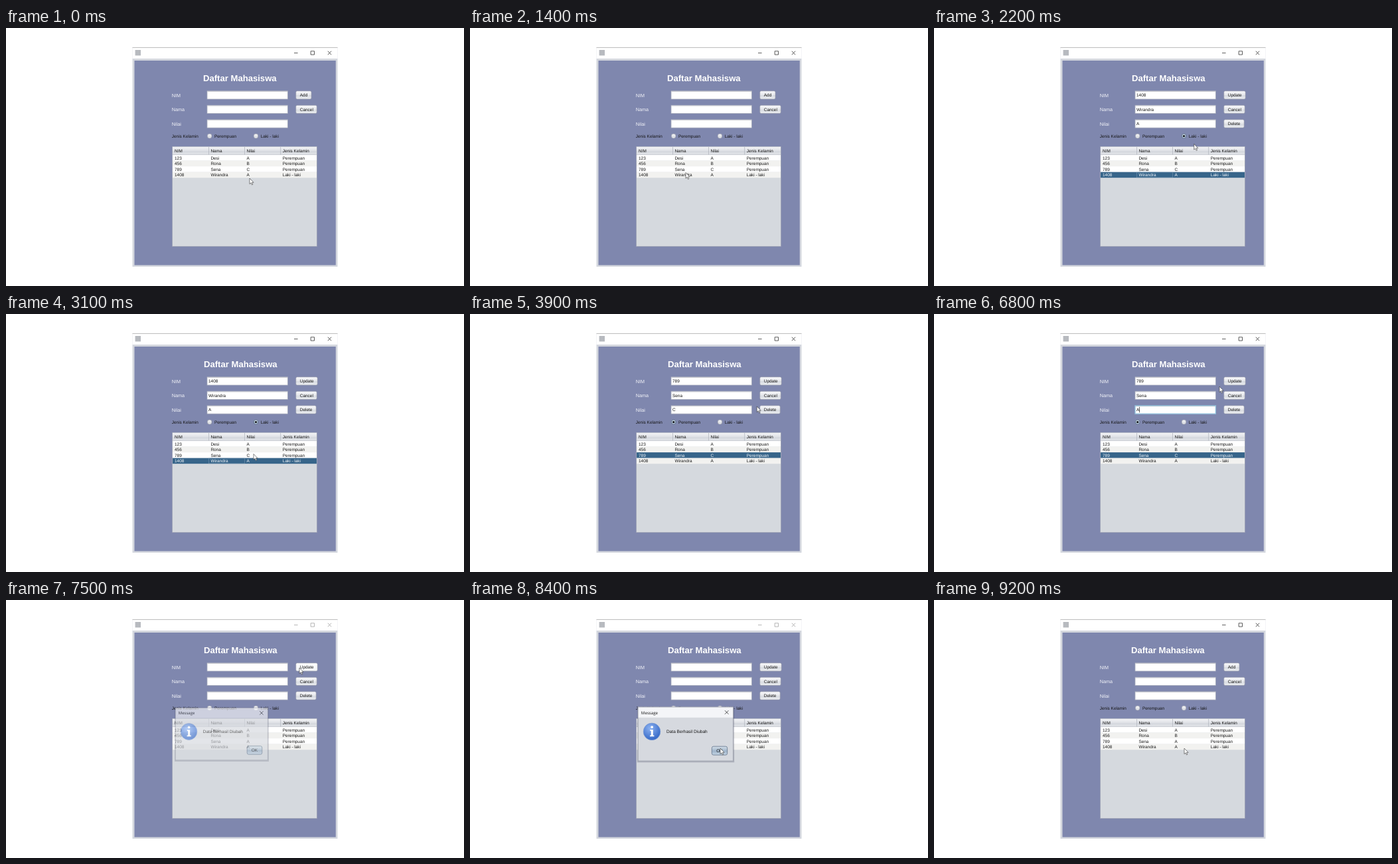
Write an HTML page that moves like this. It is 690 px wide and 388 px high and loops after 9400 ms.

```html
<!DOCTYPE html>
<html lang="id">
<head>
<meta charset="utf-8">
<title>Daftar Mahasiswa</title>
<style>
  html, body { margin: 0; width: 100%; height: 100%; overflow: hidden; background: #fff; }
  svg { display: block; width: 690px; height: 388px; }
  text { font: 6.45px "Liberation Sans", Arial, sans-serif; fill: #161616; text-rendering: geometricPrecision; white-space: pre; }
  .label { font-size: 7.2px; fill: #f4f5fa; }
  .title { font-size: 13.1px; font-weight: bold; fill: #fff; }
  .caption { font: 6px "Open Sans", sans-serif; }
  .chosen text { fill: #f4f7fa; }
  .line { fill: none; stroke: #333; stroke-width: .8; }
</style>
</head>
<body>
<svg viewBox="0 0 690 388">
  <defs>
    <linearGradient id="btn" x2="0" y2="1">
      <stop offset="0" stop-color="#fafafc"/><stop offset=".5" stop-color="#e4e6ea"/>
      <stop offset=".55" stop-color="#d8dbe1"/><stop offset="1" stop-color="#eceef1"/>
    </linearGradient>
    <linearGradient id="hot" x2="0" y2="1">
      <stop offset="0" stop-color="#fff"/><stop offset="1" stop-color="#f1f3f6"/>
    </linearGradient>
    <linearGradient id="blue" x2="0" y2="1">
      <stop offset="0" stop-color="#d4dfe9"/><stop offset=".55" stop-color="#9fb4ca"/>
      <stop offset="1" stop-color="#c4d5e5"/>
    </linearGradient>
    <linearGradient id="head" x2="0" y2="1">
      <stop offset="0" stop-color="#f3f4f6"/><stop offset=".5" stop-color="#dfe1e6"/>
      <stop offset=".55" stop-color="#d5d8de"/><stop offset="1" stop-color="#e3e5e9"/>
    </linearGradient>
    <radialGradient id="info" cx=".4" cy=".3" r=".75">
      <stop offset="0" stop-color="#8fb4f2"/><stop offset="1" stop-color="#2d62c4"/>
    </radialGradient>
  </defs>
  <rect x="190.5" y="29" width="309" height="330" fill="#d4d7de"/>
  <rect x="190.5" y="29" width="309" height="17" fill="#fff"/>
  <path d="M190.5 29.4H499.5" stroke="#a9a9a9" stroke-width=".8"/>
  <rect x="193.5" y="49" width="303.3" height="307.6" fill="#7f87ae"/>
  <rect x="194.6" y="33" width="8.4" height="8.4" fill="#b7babf"/>
  <path id="controls" class="line" d="M434 37.6h5.6M459.2 34.8h5.3v5.3h-5.3zM484.8 34.8l5.4 5.4m0-5.4l-5.4 5.4"/>
  <g id="form"></g>
  <g id="dialog">
    <rect x="254" y="161.5" width="142" height="81.5" fill="#30364f" opacity=".25"/>
    <rect x="255" y="162" width="139.5" height="79" fill="#d6d9df"/>
    <rect x="255" y="162" width="139.5" height="15.5" fill="#f4f5f8"/>
    <rect x="255.2" y="162.2" width="139" height="78.6" fill="none" stroke="#8a8e9b" stroke-width=".6"/>
    <text class="caption" x="259.8" y="172.4">Message</text>
    <path class="line" d="M382.2 167.2l5.4 5.4m0-5.4l-5.4 5.4"/>
    <circle cx="275.5" cy="198" r="12.4" fill="url(#info)" stroke="#7d9bd0" stroke-width=".7"/>
    <circle cx="275.6" cy="191.4" r="1.9" fill="#fff"/>
    <path d="M272.8 195.2h4.4v8.2h1.6v1.8h-6.2v-1.8h1.6v-6.4h-1.4z" fill="#fff"/>
    <text x="296.8" y="200" style="font-size:6.35px">Data Berhasil Diubah</text>
    <rect x="363.2" y="219.6" width="22.6" height="12.6" rx="2.4" fill="url(#blue)" stroke="#64768d" stroke-width=".8"/>
    <text x="369.8" y="228.3">OK</text>
  </g>
  <path id="arrow" d="M0 0V8.6L2 6.8L3.4 9.9L4.8 9.3L3.4 6.3H6.1Z" fill="#fff" stroke="#333" stroke-width=".6"/>
  <path id="beam" d="M-2-4.2H-.5L0-3.8L.5-4.2H2M0-3.8V3.8M-2 4.2H-.5L0 3.8L.5 4.2H2" fill="none" stroke="#222" stroke-width=".9"/>
</svg>
<script>
const LOOP = 9400, STEP = 100;
const COLS = [251, 305.4, 359.5, 413.8, 468];
const ROW_TOP = 191, ROW_H = 8.55;
const PEOPLE = [
  ['123', 'Desi', 'A', 'Perempuan'],
  ['456', 'Rona', 'B', 'Perempuan'],
  ['789', 'Sena', 'C', 'Perempuan'],
  ['1408', 'Wirandra', 'A', 'Laki - laki']
];
const FIELD_Y = [94.7, 116.2, 137.8];

// time, x, y of the pointer
const PATH = [
  [0, 367, 226], [400, 322.5, 221.5], [800, 322.5, 221.5], [1100, 327, 186],
  [1400, 325, 217.5], [1900, 325, 217.5], [2300, 414, 160], [2400, 414, 160],
  [3100, 373, 210.5], [3500, 373, 210.5], [4000, 447, 121], [4400, 455, 128],
  [4500, 441, 140], [4900, 441, 140], [5000, 405, 143], [5200, 376, 143.3],
  [5900, 376, 143.3], [6800, 430, 109], [7000, 442, 102], [7600, 442, 102],
  [7900, 403, 136], [8200, 376, 224], [8300, 376, 224], [8400, 377, 223]
];

const $ = id => document.getElementById(id);
const between = (t, a, b) => t >= a && t < b;
const clamp = v => Math.max(0, Math.min(1, v));

const text = (x, y, s, cls = '') => `<text x="${x}" y="${y}" class="${cls}">${s}</text>`;
const box = (x, y, w, h, fill, more = '') =>
  `<rect x="${x}" y="${y}" width="${w}" height="${h}" fill="${fill}" ${more}/>`;

function pointer(t) {
  const i = PATH.findIndex(p => p[0] > t);
  if (i < 0) return PATH[PATH.length - 1].slice(1);
  const [a, b] = [PATH[i - 1], PATH[i]];
  const k = (t - a[0]) / (b[0] - a[0]);
  return [a[1] + (b[1] - a[1]) * k, a[2] + (b[2] - a[2]) * k];
}

function field(y, value, focused) {
  const edge = focused ? '#8fc0dc' : '#a3a8b8';
  let out = box(303, y, 121.4, 12.3, '#fff', `stroke="${edge}" stroke-width="${focused ? 1.3 : .8}"`);
  out += box(303.4, y + .4, 120.6, .8, focused ? '#9fb8c6' : '#c3c5cc');
  out += text(305, y + 8.6, value);
  if (focused) out += box(value ? 309.3 : 305.2, y + 2, .7, 8.4, '#222');
  return out;
}

function button(label, y, w, [px, py]) {
  const hot = px >= 436.5 && px <= 436.5 + w && py >= y && py <= y + 12.3;
  return box(436.7, y, w, 12.3, `url(#${hot ? 'hot' : 'btn'})`, 'rx="2" stroke="#8e93a5" stroke-width=".7"')
    + text(442.8, y + 8.6, label);
}

function radio(x, label, on) {
  return `<circle cx="${x}" cy="162.5" r="3.4" fill="url(#${on ? 'blue' : 'btn'})" stroke="${on ? '#4c5e78' : '#969aa8'}" stroke-width=".7"/>`
    + (on ? `<circle cx="${x}" cy="162.5" r="1.5" fill="#111"/>` : '')
    + text(x + 7.2, 165, label);
}

function table(rows, chosen, [px, py]) {
  let out = box(250.6, 178.4, 217.8, 150, '#d5d9de', 'stroke="#9da2b2" stroke-width=".7"');
  ['NIM', 'Nama', 'Nilai', 'Jenis Kelamin'].forEach((name, c) => {
    const hot = px > COLS[c] && px < COLS[c + 1] && between(py, 178, 191);
    out += box(COLS[c], 178.7, COLS[c + 1] - COLS[c], 12.2, `url(#${hot ? 'hot' : 'head'})`);
    if (c) out += box(COLS[c] - .3, 179, .6, 11.6, '#a8acb5');
    out += text(COLS[c] + 3, 187, name);
  });
  out += box(251, 190.5, 217, .5, '#b4b8c0');
  rows.forEach((row, r) => {
    const y = ROW_TOP + r * ROW_H, on = r === chosen;
    out += `<g class="${on ? 'chosen' : ''}">` + box(251, y, 217, ROW_H, on ? '#37658a' : r % 2 ? '#f2f2f0' : '#fff');
    if (on && r === 3) out += box(COLS[1] + .3, y + .3, 53.6, ROW_H - .6, 'none', 'stroke="#7f9db5" stroke-width=".5"');
    row.forEach((cell, c) => out += text(COLS[c] + 3, y + 6.8, cell));
    out += '</g>';
  });
  return out;
}

function drawForm(t, pos) {
  const editing = between(t, 1700, 8900);
  const chosen = between(t, 1700, 3200) ? 3 : between(t, 3200, 7200) ? 2 : -1;
  const rows = PEOPLE.map(p => [...p]);
  if (t >= 7200) rows[2][2] = 'A';

  const values = chosen < 0 ? ['', '', '', ''] : [...rows[chosen]];
  const focused = between(t, 5100, 7200);
  if (focused) values[2] = t >= 5700 ? 'A' : '';

  let out = text(editing ? 298 : 297, 80, 'Daftar Mahasiswa', 'title');
  ['NIM', 'Nama', 'Nilai'].forEach((name, i) => {
    out += text(249.8, FIELD_Y[i] + 8.9, name, 'label');
    out += field(FIELD_Y[i], values[i], focused && i === 2);
  });
  out += editing ? button('Update', FIELD_Y[0], 32.6, pos) : button('Add', FIELD_Y[0], 23.4, pos);
  out += button('Cancel', FIELD_Y[1], 31.6, pos);
  if (editing) out += button('Delete', FIELD_Y[2], 30.6, pos);
  out += text(249.8, 165, 'Jenis Kelamin');
  out += radio(306.7, 'Perempuan', values[3] === 'Perempuan');
  out += radio(376.5, 'Laki - laki', values[3] === 'Laki - laki');
  $('form').innerHTML = out + table(rows, chosen, pos);
}

function draw(t) {
  const pos = pointer(t);
  drawForm(t, pos);

  const shown = t < 8000 ? clamp((t - 7300) / 300) : 1 - clamp((t - 8600) / 200);
  const scale = .97 + .06 * Math.min(1, shown * .75 + (shown === 1 ? .25 : 0));
  const dialog = $('dialog');
  dialog.setAttribute('opacity', shown);
  dialog.setAttribute('transform', `translate(324.7 201.5) scale(${scale}) translate(-324.7 -201.5)`);
  $('controls').style.stroke = shown > 0 ? '#a3a3a3' : '#333';

  const typing = pos[0] > 303 && pos[0] < 424 && FIELD_Y.some(y => between(pos[1], y, y + 12.3)) && shown === 0;
  $('beam').style.display = typing ? '' : 'none';
  $('arrow').style.display = typing ? 'none' : '';
  $(typing ? 'beam' : 'arrow').setAttribute('transform', `translate(${pos})`);
}

let last = -1;
const start = performance.now();
function tick() {
  const t = Math.floor((performance.now() - start) % LOOP / STEP) * STEP;
  if (t !== last) draw(last = t);
  requestAnimationFrame(tick);
}
tick();
</script>
</body>
</html>
```
